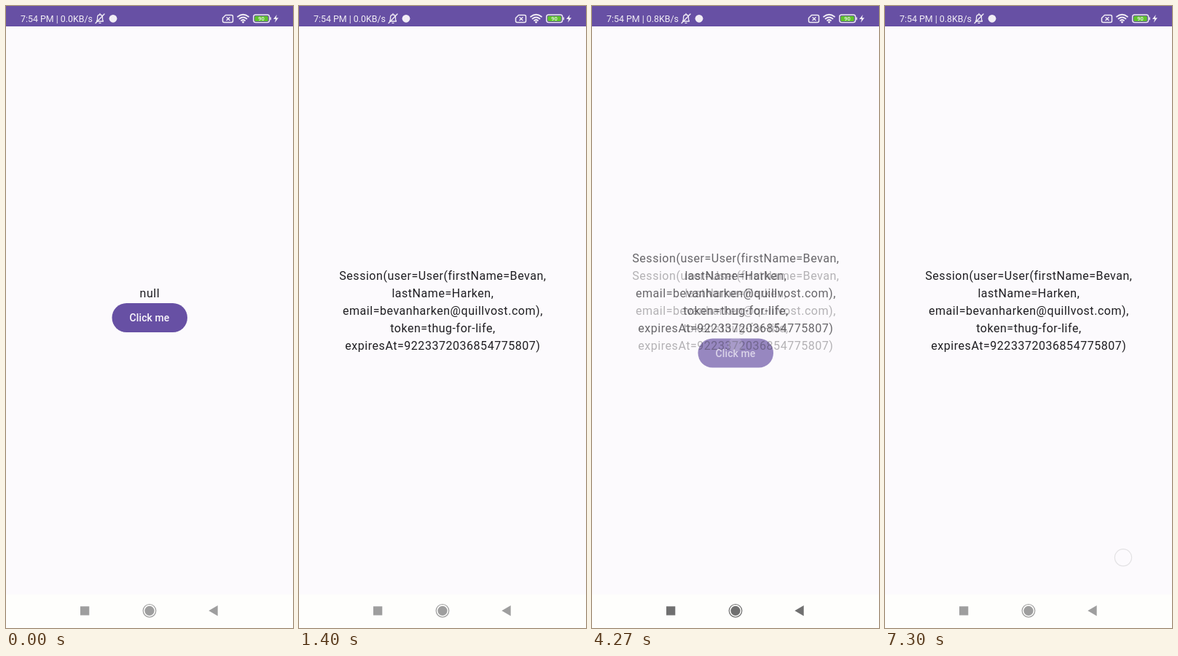
Animation of 394x854 px, one loop 7.33 s. Source, as an HTML page with a canvas:

```html
<!DOCTYPE html>
<html lang="en">
<head>
<meta charset="utf-8">
<title>Session demo</title>
<style>
  html, body { margin: 0; width: 100%; height: 100%; overflow: hidden; background: #fcfafd; }
  canvas { display: block; width: 394px; height: 854px; }
</style>
</head>
<body>
<canvas id="stage"></canvas>
<script>
const W = 394, H = 854, LOOP = 7330, FADE = 600;
const OPEN = 800, BACK = 3330, REOPEN = 4100;
const canvas = document.getElementById('stage');
const c = canvas.getContext('2d');
const dpr = window.devicePixelRatio || 1;
canvas.width = W * dpr;
canvas.height = H * dpr;

const PAPER = '#fcfafd', NAV = '#fefefc', PURPLE = '#6750a4', INK = '#1f1e22', ICON = '#f1edf5';
const FONT = 'Roboto, sans-serif';
const SESSION = [
  'Session(user=User(firstName=Bevan,',
  'lastName=Harken,',
  'email=bevanharken@quillvost.com),',
  'token=thug-for-life,',
  'expiresAt=9223372036854775807)'
];

const clamp = v => Math.max(0, Math.min(1, v));
const ramp = (t, from, to) => clamp((t - from) / (to - from));

// Cubic bezier (.4, 0, .2, 1), solved for x by bisection
function ease(x) {
  let lo = 0, hi = 1, s = 0.5;
  for (let i = 0; i < 24; i++) {
    s = (lo + hi) / 2;
    const u = 1 - s;
    if (1.2 * u * u * s + 0.6 * u * s * s + s * s * s < x) lo = s; else hi = s;
  }
  return 3 * (1 - s) * s * s + s * s * s;
}

function text(str, x, y, font, color, align = 'center', spacing = 0) {
  c.font = `${font} ${FONT}`;
  c.letterSpacing = spacing + 'px';
  c.textAlign = align;
  c.fillStyle = color;
  c.fillText(str, x, y);
}

function pill(x, y, w, h, r, color) {
  c.fillStyle = color;
  c.beginPath();
  c.roundRect(x, y, w, h, r);
  c.fill();
}

function disc(x, y, r, color) {
  c.fillStyle = color;
  c.beginPath();
  c.arc(x, y, r, 0, Math.PI * 2);
  c.fill();
}

function ring(x, y, r, color, width) {
  c.strokeStyle = color;
  c.lineWidth = width;
  c.beginPath();
  c.arc(x, y, r, 0, Math.PI * 2);
  c.stroke();
}

function poly(points, color) {
  c.fillStyle = color;
  c.beginPath();
  points.forEach(([x, y]) => c.lineTo(x, y));
  c.closePath();
  c.fill();
}

function strokePath(d, width) {
  c.lineWidth = width;
  c.stroke(new Path2D(d));
}

function bodyText(lines, top) {
  lines.forEach((line, i) =>
    text(line, 197.4, top + 17.8 + i * 24.1, '16.06px', INK, 'center', 0.51));
}

function button(top) {
  pill(145.5, top, 103.5, 40, 20, PURPLE);
  text('Click me', 197, top + 25.3, '500 14px', '#faf7fc', 'center', 0.1);
}

function homeScreen(alpha, filled) {
  if (alpha <= 0) return;
  c.globalAlpha = alpha;
  bodyText(filled ? SESSION : ['null'], filled ? 334 : 382);
  button(filled ? 456.5 : 408);
  c.globalAlpha = 1;
}

function sessionScreen(alpha) {
  if (alpha <= 0) return;
  c.globalAlpha = alpha;
  bodyText(SESSION, 358);
  c.globalAlpha = 1;
}

function statusBar(t) {
  c.fillStyle = PURPLE;
  c.fillRect(0, 0, W, 28);
  const speed = t < 3030 ? '0.0' : '0.8';
  text(`7:54 PM | ${speed}KB/s`, 20, 21.7, '12.4px', ICON, 'left');

  c.strokeStyle = ICON;
  c.lineCap = c.lineJoin = 'round';
  // muted bell
  strokePath('M124.5 21H133.5L132.5 18.5V16Q132.5 12 129 12Q125.5 12 125.5 16V18.5Z M129 10.5V12 M128 23.3H130', 1.3);
  strokePath('M123 23.5L135 11', 1.4);
  disc(147, 17.3, 5.4, ICON);
  // missing card
  strokePath('M301.5 12.5H309.5Q311.5 12.5 311.5 14.5V20.5Q311.5 22.5 309.5 22.5H299.5Q297.5 22.5 297.5 20.5V16.5Z', 1.5);
  strokePath('M303 15.8L307 19.6M307 15.8L303 19.6', 1.4);
  // wifi
  strokePath('M318 14.8Q325.5 8.8 333 14.8M320.5 17.5Q325.5 13.4 330.5 17.5M323 20Q325.5 18 328 20', 1.8);
  disc(325.5, 22.2, 1.4, ICON);
  // battery
  c.lineWidth = 1.4;
  c.beginPath();
  c.roundRect(339.7, 12, 22, 10.6, 3);
  c.stroke();
  pill(341.4, 13.7, 18.4, 7.2, 1.5, '#5fc32c');
  pill(362.6, 15.3, 1.4, 4, 0.7, ICON);
  text('90', 350.6, 20.1, '500 7.5px', ICON);
  poly([[371.8, 12], [367, 18], [370.2, 18], [369, 22.8], [374, 16.3], [370.8, 16.3]], ICON);
}

function navBar(t) {
  c.fillStyle = NAV;
  c.fillRect(0, 808, W, H - 808);
  const press = ramp(t, 3330, 3450) * (1 - ramp(t, 3700, 4030));
  if (press > 0) {
    c.globalAlpha = press;
    pill(246, 807, 80, 48, 23, '#f1f2f3');
    c.globalAlpha = 1;
  }
  const dark = ramp(t, 3330, 3480) * (1 - ramp(t, 5730, 6300));
  const shade = Math.round(158 - 46 * dark);
  const color = `rgb(${shade}, ${shade}, ${shade})`;
  c.fillStyle = color;
  c.fillRect(102, 824.3, 12.3, 12.2);
  ring(197, 830.3, 8.8, color, 1.2);
  disc(197, 830.3, 6.6, color);
  poly([[278.3, 830.3], [290.7, 823], [290.7, 837.6]], color);
}

function touches(t) {
  if (t >= 4070 && t < 4470) {
    c.globalAlpha = 0.45 * (1 - ramp(t, 4070, 4470));
    disc(197, 465, 10, '#e6e6ea');
    c.globalAlpha = 1;
  }
  if (t >= 7300) ring(327, 757.3, 11.6, '#e3e2e4', 1.2);
}

function draw(t) {
  c.setTransform(dpr, 0, 0, dpr, 0, 0);
  c.fillStyle = PAPER;
  c.fillRect(0, 0, W, H);

  const fade = start => ease(ramp(t, start, start + FADE));
  const shown = clamp(fade(OPEN) - fade(BACK) + fade(REOPEN));
  if (t >= BACK && t < REOPEN) {
    sessionScreen(shown);
    homeScreen(1 - shown, true);
  } else {
    homeScreen(1 - shown, t >= OPEN);
    sessionScreen(shown);
  }
  touches(t);
  statusBar(t);
  navBar(t);
}

const began = performance.now();
function tick() {
  draw((performance.now() - began) % LOOP);
  requestAnimationFrame(tick);
}
tick();
</script>
</body>
</html>
```
